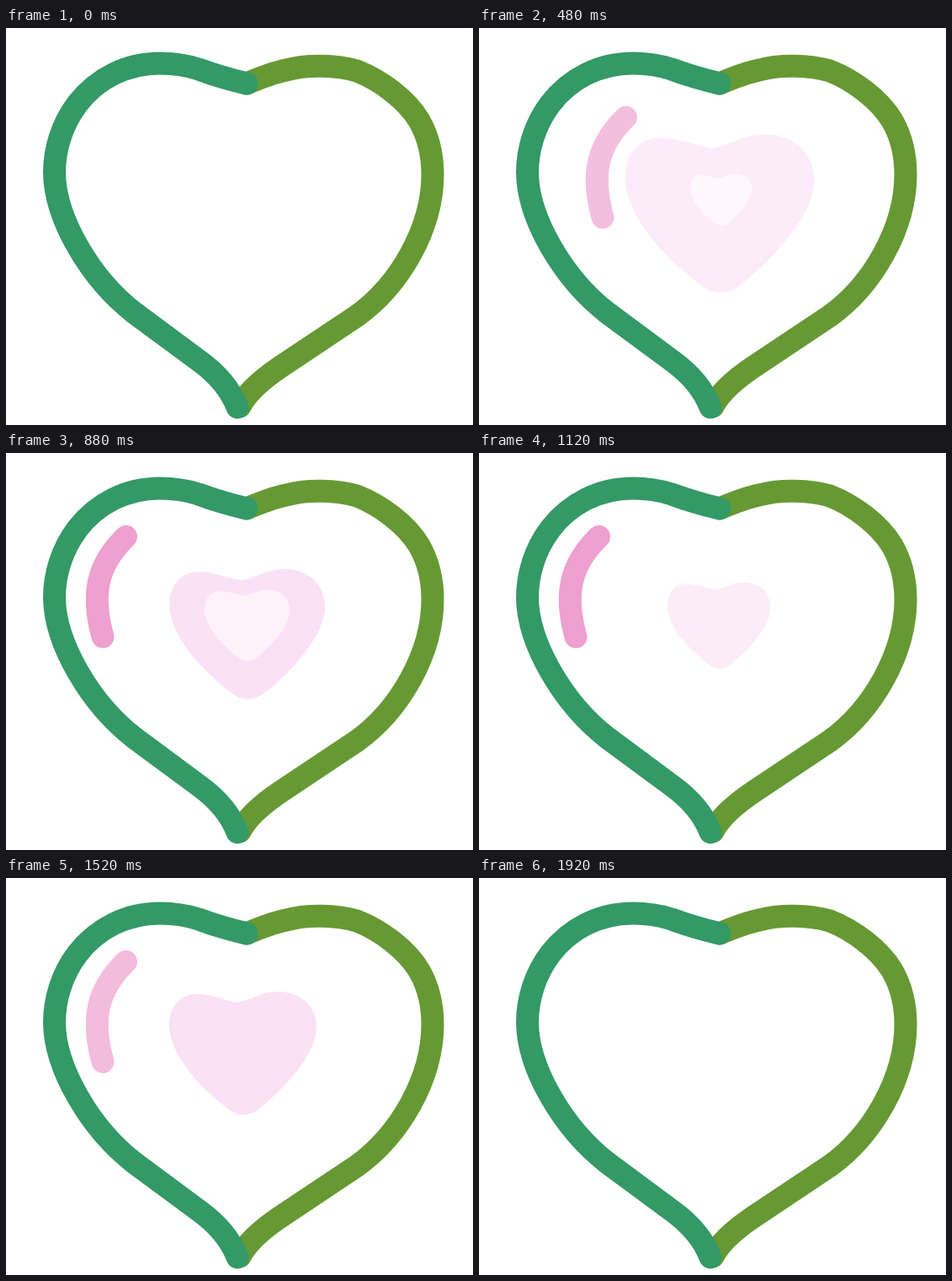
Animation, 555 px wide and 472 px high, one loop 2 s. Source, as an HTML page with a canvas:

```html
<!DOCTYPE html>
<html>
<head>
<meta charset="utf-8">
<style>
html, body { margin: 0; width: 100%; height: 100%; overflow: hidden; background: #fff; }
canvas { display: block; }
</style>
</head>
<body>
<canvas id="stage" width="555" height="472"></canvas>
<script>
const ctx = document.getElementById('stage').getContext('2d');
const LOOP = 2000, STEP = 80, HEART_WIDTH = 238;

const left = new Path2D('M286 66Q256 59 229 49Q207 42 183 42C143 42 108 60 85 90C66 115 57.5 145 57.5 172C58 226 100 298 153 339L230 396Q263 420 275 451');
const right = new Path2D('M286 66C305 58 318 53 333 50C358 43 393 44 417 51C445 62 476 85 491 110Q507 138 507 174C507 238 468 306 416 343L326 403Q289 428 278 450');
const shine = new Path2D('M142.5 99.5C108 133 101 168 115 218.5');
const heart = new Path2D('M-10-83C-28-85-48-96-76-96C-104-95-119-74-119-45C-117 10-60 62-22 91C-8 102 10 102 26 90C70 55 119 0 119-42C119-78 92-100 56-100C28-100 10-84-10-83Z');

const ramp = (t, from, to) => Math.min(1, Math.max(0, (t - from) / (to - from)));

// Opaque pink, from white at 0 to full at 1
const pink = a => `rgb(${255 - 4 * a}, ${255 - 30 * a}, ${255 - 10 * a})`;

function drawHeart(width, x, y, tint) {
  ctx.save();
  ctx.translate(x, y);
  ctx.scale(width / HEART_WIDTH, width / HEART_WIDTH);
  ctx.fillStyle = pink(tint);
  ctx.fill(heart);
  ctx.restore();
}

function stroke(path, color) {
  ctx.strokeStyle = color;
  ctx.stroke(path);
}

function draw(now) {
  const t = Math.floor(now % LOOP / STEP) * STEP;
  const rise = ramp(t, 0, 720), swap = ramp(t, 720, 1360), swell = ramp(t, 1360, 1520);

  ctx.clearRect(0, 0, 555, 472);
  ctx.lineWidth = 27;
  ctx.lineCap = 'round';

  // The outer heart shrinks behind the inner one as that grows
  drawHeart(184 + 61 * rise - 241 * swap, 286 + 3 * swap, 216 + 7.5 * rise - 31 * swap, rise);
  drawHeart(
    45 + 42.5 * rise + 56.5 * swap + 31 * swell,
    288 - 0.5 * rise - 3.5 * swap - 2.5 * swell,
    203 + 2 * rise + 0.5 * swap + 3 * swell,
    0.35 * rise + 0.45 * swap + 0.2 * swell - ramp(t, 1520, 1920)
  );

  ctx.save();
  ctx.translate(96 * (1 - rise), 20 * (1 - rise));
  ctx.globalAlpha = rise * (1 - ramp(t, 1360, 1920));
  stroke(shine, '#eea0cf');
  ctx.restore();

  stroke(right, '#693');
  stroke(left, '#396');
}

const start = performance.now();
function tick() {
  draw(performance.now() - start);
  requestAnimationFrame(tick);
}
tick();
</script>
</body>
</html>
```
